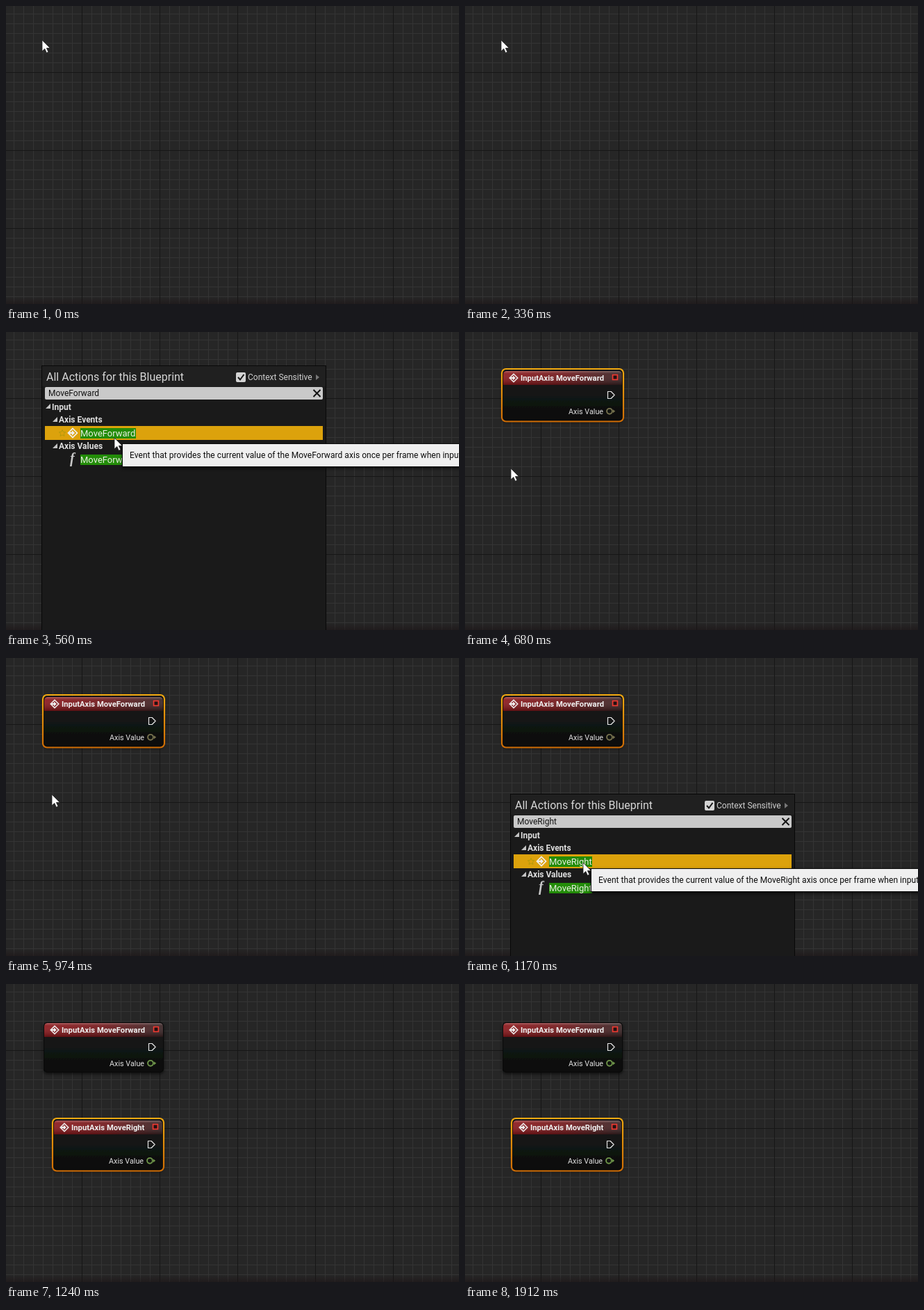
Animation, 652 px wide and 428 px high, one loop 2.36 s. Source, as an HTML page:

```html
<!DOCTYPE html>
<html lang="en">
<head>
<meta charset="utf-8">
<title>Adding input axis events</title>
<style>
html, body { margin: 0; width: 100%; height: 100%; overflow: hidden; background: #262626; }
svg { display: block; width: 652px; height: 428px; font: 12px Roboto, sans-serif; }
text { white-space: pre; }
.bold { font-weight: 700; }
.anim { animation: 2360ms step-end infinite; }
.menu1 { animation-name: menu1; }
.menu2 { animation-name: menu2; }
.node1 { animation-name: node1; }
.node2 { animation-name: node2; }
.ring1 { animation-name: ring1; }
.pin { animation-name: pin; }
.cursor { animation-name: cursor; }
@keyframes menu1 { 0%, 28.8136%, 100% { opacity: 0 } 23.7288% { opacity: 1 } }
@keyframes menu2 { 0%, 52.5424%, 100% { opacity: 0 } 49.5763% { opacity: 1 } }
@keyframes node1 { 0% { opacity: 0 } 28.8136%, 100% { opacity: 1 } }
@keyframes node2 { 0% { opacity: 0 } 52.5424%, 100% { opacity: 1 } }
@keyframes ring1 { 0% { opacity: 1 } 52.5424%, 100% { opacity: 0 } }
@keyframes pin { 0% { color: #77734f } 52.5424%, 100% { color: #6f964a } }
@keyframes cursor {
  0% { transform: translate(52px, 49px); opacity: 1 }
  23.7288% { transform: translate(156px, 152px); opacity: 1 }
  28.8136% { transform: translate(66px, 196px); opacity: 1 }
  49.5763% { transform: translate(170px, 294px); opacity: 1 }
  52.5424%, 100% { transform: translate(170px, 294px); opacity: 0 }
}
</style>
</head>
<body>
<svg id="stage" viewBox="0 0 652 428" xmlns="http://www.w3.org/2000/svg">
  <defs>
    <pattern id="grid" x="109" y="95" width="112" height="112" patternUnits="userSpaceOnUse">
      <path id="minor" stroke="#343434" fill="none"/>
      <path d="M.5 0V112M0 .5H112" stroke="#161616"/>
    </pattern>
    <linearGradient id="edge" x2="0" y2="1">
      <stop offset="0" stop-color="#1c1416" stop-opacity="0"/>
      <stop offset="1" stop-color="#1c1416" stop-opacity=".6"/>
    </linearGradient>
    <linearGradient id="ring" x2="0" y2="1">
      <stop offset="0" stop-color="#f2a90f"/>
      <stop offset="1" stop-color="#cf6c04"/>
    </linearGradient>
    <linearGradient id="body" x2="0" y2="1">
      <stop offset="0" stop-color="#191c1a"/>
      <stop offset=".5" stop-color="#121513"/>
      <stop offset="1" stop-color="#0b0d0c"/>
    </linearGradient>
    <linearGradient id="head">
      <stop offset="0" stop-color="#8b1519"/>
      <stop offset=".5" stop-color="#701619"/>
      <stop offset="1" stop-color="#352122"/>
    </linearGradient>
    <linearGradient id="gloss" x2="0" y2="1">
      <stop offset="0" stop-color="#fff" stop-opacity=".3"/>
      <stop offset=".2" stop-color="#fff" stop-opacity=".08"/>
      <stop offset="1" stop-color="#000" stop-opacity=".28"/>
    </linearGradient>
    <filter id="shadow" x="-10%" y="-15%" width="120%" height="135%">
      <feDropShadow dx="0" dy="2" stdDeviation="2" flood-color="#000" flood-opacity=".65"/>
    </filter>
    <g id="event">
      <path d="M0-5.8L5.8 0 0 5.8-5.8 0Z" fill="none" stroke="#f0f0f0" stroke-width="1.5"/>
      <path d="M-4.6-1.2H-1V-3.6L2.8 0-1 3.6V1.2H-4.6Z" fill="#f0f0f0"/>
    </g>
  </defs>
  <rect width="652" height="428" fill="#262626"/>
  <rect width="652" height="428" fill="url(#grid)"/>
  <rect y="418" width="652" height="10" fill="url(#edge)"/>
  <g id="scene"></g>
  <path class="anim cursor" d="M0 0V16L3.8 12.5 6.4 18.3 9 17.1 6.4 11.5H11.4Z" fill="#fff" stroke="#222" stroke-width=".8"/>
</svg>
<script>
const rect = (x, y, w, h, fill, more = '') =>
  `<rect x="${x}" y="${y}" width="${w}" height="${h}" fill="${fill}" ${more}/>`;
const text = (x, y, str, fill, more = '') =>
  `<text x="${x}" y="${y}" fill="${fill}" ${more}>${str}</text>`;
const path = (d, more) => `<path d="${d}" ${more}/>`;

// Event node with its top left corner at x, y
function node(x, y, w, name, cls, ringCls) {
  const r = w - 17;
  return `<g class="anim ${cls}"><g transform="translate(${x} ${y})">
    ${rect(0, 0, w, 72, 'url(#body)', 'rx="5" filter="url(#shadow)"')}
    ${['head', 'gloss'].map(id =>
      path(`M1 21V6Q1 1 6 1H${w - 6}Q${w - 1} 1 ${w - 1} 6V21Z`, `fill="url(#${id})"`)).join('')}
    ${rect(.5, .5, w - 1, 71, 'none', 'rx="5" stroke="#080808"')}
    <g class="${ringCls}">${rect(-1, -2, w + 2, 75.5, 'none', 'rx="6" stroke="url(#ring)" stroke-width="2.2"')}</g>
    <use href="#event" x="16" y="11"/>
    ${text(26, 15, 'InputAxis ' + name, '#eee', 'class="bold" font-size="11.25"')}
    ${rect(r + 2.6, 6.6, 6.8, 6.8, '#241012', 'stroke="#ed3a32" stroke-width="1.7"')}
    ${path(`M${r - 4.5} 30.5h4.7l5 5-5 5h-4.7z`, 'fill="none" stroke="#e6e6e6" stroke-width="1.2" stroke-linejoin="round"')}
    ${text(r - 61, 63, 'Axis Value', '#e2e2e2', 'font-size="10.8"')}
    <g class="anim pin">
      <circle cx="${r - 2}" cy="58.8" r="3.9" fill="#10120f" stroke="currentColor" stroke-width="1.9"/>
      ${path(`M${r + 2.8} 56.2l3.4 2.6-3.4 2.6z`, 'fill="currentColor"')}
    </g>
  </g></g>`;
}

const arrow = (x, y) => path(`M${x} ${y}v-7l-7 7z`, 'fill="#c4c4c4"');
const found = (y, name, w) =>
  rect(107, y - 12, w, 15, '#238c08') + text(107, y, name, '#e8efe2', 'font-size="13"');

// Action menu with its search result and tooltip
function menu(x, y, name, w, cls) {
  return `<g class="anim ${cls}"><g transform="translate(${x} ${y})">
    ${rect(51.5, 48.5, 409, 400, '#1a1a1a', 'stroke="#080808"')}
    ${rect(52, 49, 408, 29, '#202020')}
    ${text(58, 70, 'All Actions for this Blueprint', '#d6d6d6', 'font-size="16"')}
    ${rect(331, 58, 14, 14, '#d4d4d4', 'rx="2"')}
    ${path('M334 65l3 3.5 5.5-7.5', 'fill="none" stroke="#181818" stroke-width="2"')}
    ${text(348, 69, 'Context Sensitive', '#cfcfcf')}
    ${path('M446 61v8l5-4z', 'fill="#777"')}
    ${rect(56, 79, 400, 18, '#c9c9c9', 'rx="2"')}
    ${text(61, 92, name, '#111')}
    ${path('M442.5 83l10 10m0-10l-10 10', 'stroke="#111" stroke-width="2"')}
    ${arrow(64, 110)}${text(66, 112, 'Input', '#ddd', 'class="bold"')}
    ${arrow(74, 129)}${text(76, 130, 'Axis Events', '#ddd', 'class="bold"')}
    ${rect(56, 135, 400, 20, '#dca20c')}
    ${path('M81 140.5l1.4 3.1 3.3.3-2.5 2.3.8 3.3-3-1.7-3 1.7.8-3.3-2.5-2.3 3.3-.3z', 'fill="none" stroke="#b39a0b"')}
    <use href="#event" transform="translate(96 145) scale(1.12)"/>
    ${found(150, name, w)}
    ${arrow(74, 167)}${text(76, 168, 'Axis Values', '#ddd', 'class="bold"')}
    ${text(92, 188, 'f', '#c8c8c8', 'font-family="Liberation Serif, serif" font-size="20" font-style="italic" font-weight="700"')}
    ${found(188, name, w)}
    </g><g transform="translate(${x} ${y && y - 5})">
    ${rect(167.5, 160.5, 600, 33, '#efefef', 'stroke="#111" filter="url(#shadow)"')}
    ${text(178, 181, `Event that provides the current value of the ${name} axis once per frame when input`, '#0c0c0c', 'letter-spacing=".05"')}
  </g></g>`;
}

let lines = '';
for (let p = 14.5; p < 112; p += 14) lines += `M${p} 0V112M0 ${p}H112`;
document.getElementById('minor').setAttribute('d', lines);

document.getElementById('scene').innerHTML =
  node(54, 55, 173, 'MoveForward', 'node1', 'anim ring1') +
  node(68, 195, 158, 'MoveRight', 'node2', '') +
  menu(0, 0, 'MoveForward', 80, 'menu1') +
  menu(14, 147, 'MoveRight', 62, 'menu2');
</script>
</body>
</html>
```
